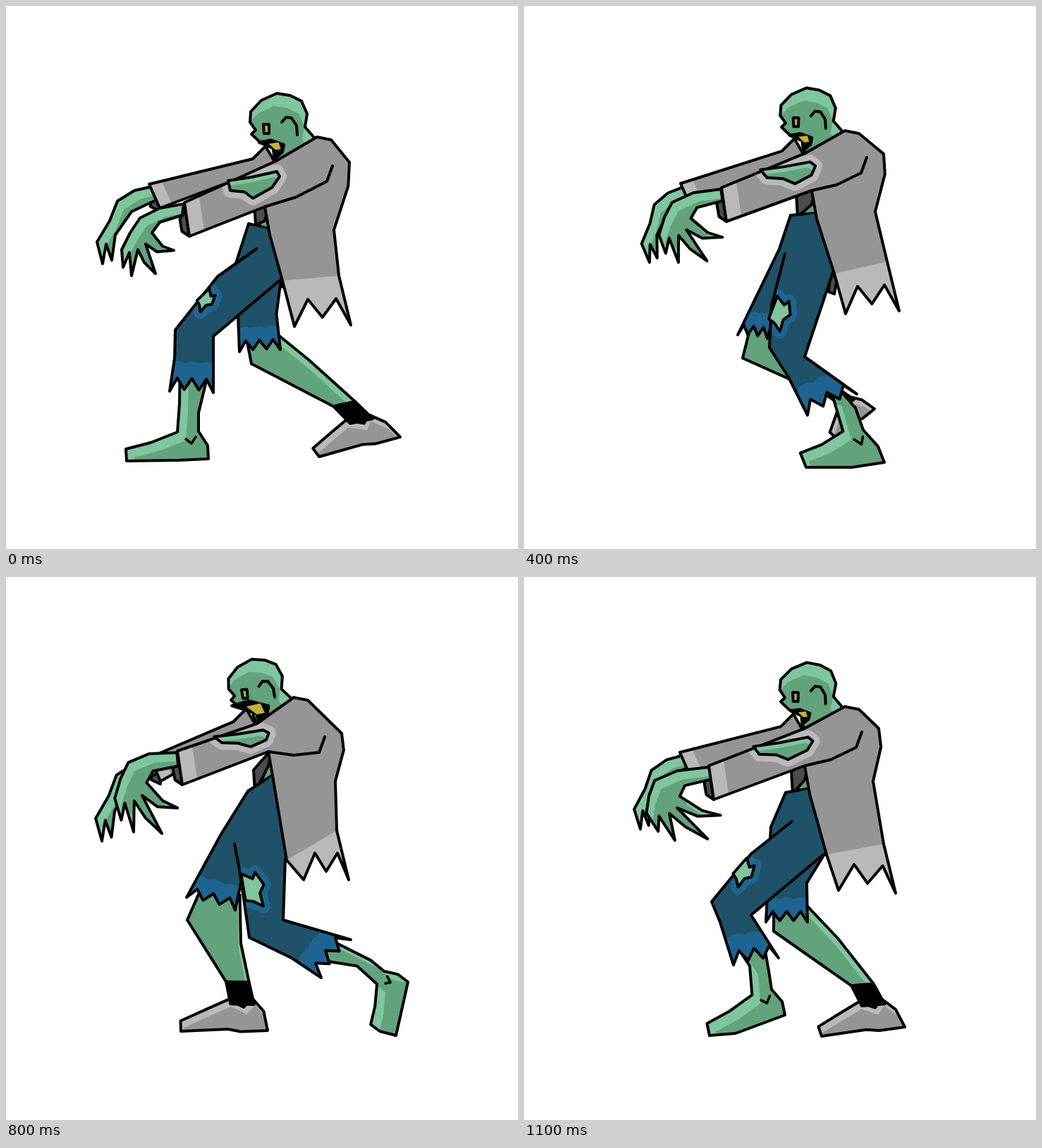
Recreate the animation shown at these times as an HTML page with a canvas. Size 726 px wide and 771 px high, loop 1200 ms.

```html
<!DOCTYPE html>
<html lang="en">
<head>
<meta charset="utf-8">
<title>Walking zombie</title>
<style>
html, body { margin: 0; height: 100%; overflow: hidden; background: #fff; }
canvas { display: block; }
</style>
</head>
<body>
<canvas id="stage" width="726" height="771"></canvas>
<script>
const ctx = document.getElementById('stage').getContext('2d');
const skin = '#7fc59d', skinDark = '#62a27c', cloth = '#959595', clothPale = '#b9b9b9';
const lining = '#4c4c4c', denim = '#1f5169', denimPale = '#1f6490', gold = '#c6ae3c';

const points = text => text.split(' ').map(pair => pair.split(',').map(Number));
const lerp = ([x, y], [u, v], t) => [x + (u - x) * t, y + (v - y) * t];

// Joints: one place per key pose.
const keySteps = [0, 2, 4, 6, 8, 10, 11];
const tracks = {};
const track = (name, text) => { tracks[name] = points(text); };

track('collar', '441,186 431,180 455,177 397,171 408,171 455,176 455,184');
track('nose', '348,182 337,175 365,172 309,175 319,175 363,168 364,177');
track('back', '487,222 477,218 510,210 465,213 476,222 511,211 503,215');
track('waist', '465,318 463,312 498,292 457,297 467,290 498,290 495,290');
track('pit', '367,285 368,276 408,262 363,248 372,248 408,262 398,268');
track('flapFront', '409,455 420,449 456,437 402,429 422,430 458,434 446,445');
track('flapBack', '489,453 480,446 532,433 472,428 486,430 532,430 527,449');
track('cuff', '253,279 240,271 280,258 222,243 243,247 280,258 262,268');
track('finger', '178,383 181,379 219,364 178,355 181,362 218,367 214,374');
track('farWrist', '213,265 203,258 232,264 205,262 214,268 232,264 231,261');
track('farFinger', '137,366 137,355 178,364 128,369 136,375 179,363 165,358');

track('hip', '344,309 340,304 378,297 338,303 343,304 380,299 371,306');
track('crease', '355,345 329,345 370,352 315,378 324,379 370,351 380,347');
track('thigh', '300,384 308,388 351,425 336,447 331,415 343,398 322,393');
track('knee', '240,460 265,470 348,485 365,516 345,512 316,482 266,461');
track('shin', '239,500 274,500 375,527 412,537 405,541 345,520 278,490');
track('hemFront', '232,547 300,574 402,581 442,582 447,569 396,555 297,551');
track('hemBack', '294,549 366,559 472,551 499,529 489,515 449,518 361,541');
track('ham', '294,469 318,488 398,498 402,480 393,487 364,482 322,480');
track('seat', '390,388 392,381 438,378 395,390 396,400 437,375 427,392');
track('toe', '171,646 268,651 400,655 497,647 530,645 446,654 263,651');
track('ball', '245,645 335,651 465,655 550,650 553,651 463,655 300,648');
track('heel', '287,643 378,648 511,648 575,590 570,575 500,575 370,622');
track('ankle', '258,603 344,600 466,601 524,580 530,568 452,572 337,588');
track('patchTop', '290,402 295,407 362,412 335,422 336,420 342,405 318,400');
track('patchEnd', '275,434 300,450 362,462 374,472 364,468 345,458 303,440');

track('farThigh', '326,365 312,378 362,345 294,362 305,365 350,375 350,355');
track('farHemFront', '331,491 333,491 303,467 245,452 256,455 366,474 343,490');
track('farHemBack', '389,488 389,486 345,472 308,470 325,473 397,484 402,490');
track('farShin', '348,508 348,508 310,500 246,490 257,487 418,572 354,503');
track('farCalf', '430,503 445,500 385,510 312,520 333,520 442,540 445,513');
track('shoeToe', '444,640 548,646 442,613 194,644 248,645 381,650 422,652');
track('shoeHeel', '559,612 569,552 497,572 319,641 371,644 500,642 540,639');
track('sock', '480,566 487,543 440,550 287,577 328,576 452,592 480,580');

// Rigid pieces, each drawn once in its own frame.
const head = points('440,190 424,172 427,153 419,135 403,127 384,124 362,134 347,150 346,165 354,176 348,182 360,193 378,198 380,212 383,220');
const eye = points('365,168 373,168 373,181 366,181');
const ear = points('391,165 397,158 405,159 412,170 413,183');
const mouth = points('360,194 376,191 393,197 391,207 383,214 382,203');
const teethInMouth = points('373,196 386,194 389,203 382,204');
const tear = points('315,248 348,243 384,235 388,242 377,258 366,264 350,273 338,264 318,262');
const hand = points('252,281 218,287 190,301 176,322 164,346 166,371 175,350 178,383 187,346 196,364 212,380 198,338 214,349 238,347 222,341 207,322 218,307 250,297');
const farHand = points('213,255 182,262 158,277 147,305 129,335 137,366 142,338 150,361 155,325 178,292 214,275');
const patch = points('339,405 350,418 357,412 360,432 350,440 346,458 337,446 328,440');
const shoe = points('194,644 196,630 240,612 270,600 290,610 305,598 318,615 319,641 280,643 262,640');
const sock = points('271,576 304,576 306,606 272,606');
const shinFront = points('246,565 243,605 205,620 170,629 171,646');
const shinBack = points('287,643 286,624 273,604 273,578');
const ankleMark = points('255,615 263,621 269,612');

let joints;
const at = (name, dx = 0, dy = 0) => [joints[name][0] + dx, joints[name][1] + dy];

function setPose(step) {
  const i = keySteps.findLastIndex(key => key <= step);
  const next = (i + 1) % keySteps.length;
  const mix = (step - keySteps[i]) / ((keySteps[next] || 12) - keySteps[i]);
  joints = {};
  for (const name in tracks) joints[name] = lerp(tracks[name][i], tracks[name][next], mix);
}

// Affine map that takes three rest anchors to three placed ones; two anchors turn and scale.
function frame(rest, placed) {
  const full = ([a, b, c]) => [a, b, c || [a[0] + a[1] - b[1], a[1] + b[0] - a[0]]];
  const [a, b, c] = full(rest), [A, B, C] = full(placed);
  const cross = (p, q) => (p[0] - a[0]) * (q[1] - a[1]) - (p[1] - a[1]) * (q[0] - a[0]);
  return pts => pts.map(p => {
    const s = cross(p, c) / cross(b, c), t = cross(b, p) / cross(b, c);
    return A.map((v, k) => v + s * (B[k] - v) + t * (C[k] - v));
  });
}

// Frame that follows named joints from the key pose in which the piece was drawn.
const follow = (key, ...names) => frame(names.map(n => tracks[n][key]), names.map(n => joints[n]));

// Ragged hem with the given number of tips.
function ragged(a, b, tips, depth, lift) {
  const dx = b[0] - a[0], dy = b[1] - a[1], length = Math.hypot(dx, dy), last = 2 * tips - 2;
  return Array.from({ length: last + 1 }, (_, i) => {
    const rise = (i % 2 ? depth : i % last ? lift : 0) / length;
    const [x, y] = lerp(a, b, i / last);
    return [x + dy * rise, y - dx * rise];
  });
}

function trace(pts, closed) {
  ctx.beginPath();
  pts.forEach(p => ctx.lineTo(...p));
  if (closed) ctx.closePath();
}

function fill(pts, color) {
  trace(pts, true);
  ctx.fillStyle = color;
  ctx.fill();
}

function line(pts, closed, width = 4, color = '#000') {
  trace(pts, closed);
  ctx.lineWidth = width;
  ctx.strokeStyle = color;
  ctx.stroke();
}

// Fills a part, paints details clipped to it, then outlines it.
function part(pts, color, details, outline = () => line(pts, true)) {
  fill(pts, color);
  if (details) {
    ctx.save();
    trace(pts, true);
    ctx.clip();
    details();
    ctx.restore();
  }
  outline();
}

function shaded(pts, dx, dy, light = skin, dark = skinDark) {
  part(pts, light, () => fill(pts.map(([x, y]) => [x + dx, y + dy]), dark));
}

function drawFarArm(chin) {
  const [x, y] = chin;
  const cuffTop = at('farWrist', -10, -12), cuffEnd = at('farWrist', 5, 22);
  part([at('farWrist', -8, 2), at('farWrist', 4, 8), at('farWrist', 5, 26), at('farWrist', -8, 20)], lining);
  shaded(follow(0, 'farWrist', 'farFinger')(farHand), 9, 12);
  part([[x - 15, y - 21], [x - 33, y - 3], cuffTop, cuffEnd, [x, y + 5]], cloth,
    () => line([cuffTop, cuffEnd], false, 36, clothPale));
}

function drawFarLeg() {
  const inShoe = follow(3, 'shoeToe', 'shoeHeel', 'sock');
  const top = t => lerp(lerp(joints.farHemFront, joints.farHemBack, t), lerp(joints.farThigh, joints.seat, t), .25);
  const [ankleFront, ankleBack] = inShoe(sock);
  shaded([top(.15), joints.farShin, ankleFront, ankleBack, joints.farCalf, top(.85)], -3, 10);
  shaded(inShoe(shoe), 4, 10, clothPale, cloth);
  part(inShoe(sock), '#000');

  const drop = Math.max(0, (392 - joints.seat[1]) * 2);
  part([at('seat', -4, 0), at('seat', -6, drop), at('seat', 2, drop + 3), at('seat', 6, drop / 3)], lining);
  part([at('pit', 6), at('hip', 14), at('pit', 12, 52)], skinDark);
  part([at('hip', 8, -30), at('pit', 6, -5), at('pit', 0, 20), at('hip', 10, 2)], lining);

  const hem = ragged(joints.farHemFront, joints.farHemBack, 4, 15, 2);
  part([joints.hip, joints.farThigh, ...hem, lerp(joints.farHemBack, joints.pit, .25), joints.seat, at('pit', 8, 32)],
    denim, () => line(hem, false, 40, denimPale));
}

function drawNearLeg() {
  const inFoot = follow(0, 'toe', 'heel', 'ankle');
  const top = t => lerp(lerp(joints.hemFront, joints.hemBack, t), lerp(joints.knee, joints.ham, t), .35);
  shaded([top(.2), ...inFoot(shinFront), joints.ball, ...inFoot(shinBack), top(.88)], 12, 12);
  line(inFoot(ankleMark), false, 3.5);

  const hole = follow(5, 'patchTop', 'patchEnd')(patch);
  const hem = ragged(joints.hemFront, joints.hemBack, 4, 19, 3);
  const leg = [at('hip', 5, 3), joints.crease, joints.thigh, joints.knee, joints.shin,
    ...hem, joints.ham, joints.seat, at('pit', 8, 32)];
  part(leg, denim, () => {
    line(hem, false, 48, denimPale);
    line(hole, true, 20, denimPale);
  }, () => line(leg.slice(1, -1)));
  part(hole, skin);
}

function drawHead(inHead) {
  shaded(inHead(head), -4, 18);
  part(inHead(eye), gold);
  line(inHead(ear));
  // The jaw drops as the head tips back.
  const gape = 1 + (joints.nose[1] - joints.collar[1] + 5) / 14;
  const open = pts => inHead(pts.map(p => lerp([378, 200], p, gape)));
  part(open(mouth), '#000');
  fill(open(teethInMouth), gold);
}

function drawCoat(chin) {
  const cuffEnd = at('cuff', 7, 48), middle = lerp(joints.cuff, cuffEnd, .5);
  part([lerp(joints.cuff, cuffEnd, .2), [middle[0] - 10, middle[1]], [middle[0] - 7, middle[1] + 17], cuffEnd], lining);
  const thumb = ([x, y]) => [x + 54, y - 40];
  const [restCuff, restFinger, restPit] = ['cuff', 'finger', 'pit'].map(n => tracks[n][0]);
  shaded(frame([restCuff, restFinger, thumb(restFinger)],
    [joints.cuff, joints.finger, thumb(joints.finger)])(hand), 9, 12);

  const hole = frame([restCuff, restPit, head.at(-1)], [joints.cuff, joints.pit, chin])(tear);
  const band = [at('seat', 2, 2), ...ragged(joints.flapFront, joints.flapBack, 3, 38, 12), at('flapBack', -17, -70)];
  const [x, y] = lerp(joints.back, joints.waist, .35);
  part([joints.collar, chin, joints.cuff, cuffEnd, joints.pit, at('pit', 7, 40), ...band,
    joints.waist, [x + 6, y], joints.back, at('collar', 20, 4)], cloth, () => {
    fill(band, clothPale);
    line([joints.cuff, cuffEnd], false, 44, clothPale);
    line(hole, true, 20, clothPale);
  });
  line([joints.pit, lerp(joints.pit, at('back', -32, 36), .5), at('back', -32, 27), at('back', -24, 5)]);
  shaded(hole, -3, 8);
}

function draw(now) {
  setPose(Math.floor(now / 100) % 12);
  ctx.fillStyle = '#fff';
  ctx.fillRect(0, 0, 726, 771);
  ctx.lineJoin = ctx.lineCap = 'round';

  const inHead = follow(0, 'collar', 'nose');
  const chin = inHead(head).at(-1);
  drawFarArm(chin);
  drawFarLeg();
  drawNearLeg();
  drawHead(inHead);
  drawCoat(chin);
}

const start = performance.now();
function tick() {
  draw(performance.now() - start);
  requestAnimationFrame(tick);
}
tick();
</script>
</body>
</html>
```
